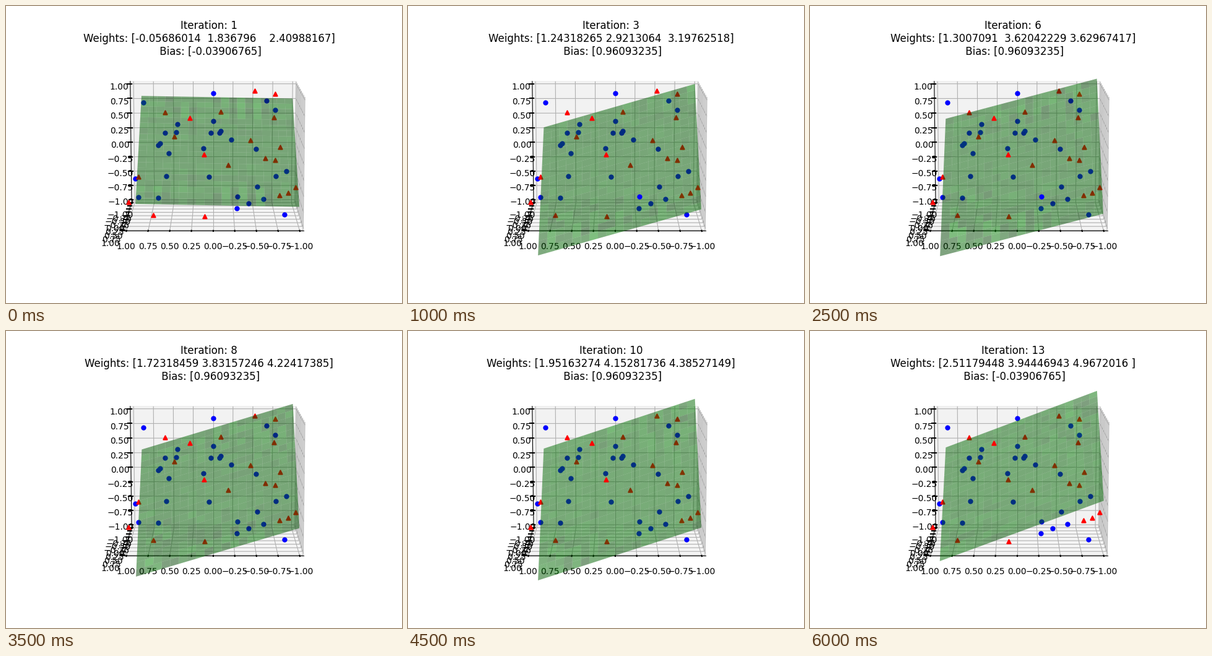
Recreate the animation shown at these times as a matplotlib script. Size 640 by 480 pixels, loop 6.5 s.

```python
import numpy as np
import matplotlib.pyplot as plt
from matplotlib.animation import FuncAnimation
from matplotlib.collections import LineCollection, PolyCollection

W, H = 640, 480
ELEV = np.radians(10)
COS, SIN = np.cos(ELEV), np.sin(ELEV)
DIST = 10
SX, SY = 496 / 0.185, 369.6 / 0.185
CX, CY = 80 + 0.095 * SX, H - 52.8 - 0.095 * SY

BOX = 1 + 1 / 24          # half size of the axes box
LABEL = BOX + 0.1476      # where tick labels sit
TICK_IN, TICK_OUT = BOX - 0.1 / 6, BOX + 0.2 / 6
TICKS = np.linspace(-1, 1, 9)

# weights and bias for each iteration
LOW, HIGH = -0.03906765, 0.96093235
STEPS = [
    (-0.05686014, 1.836796, 2.40988167, LOW),
    (1.70490788, 2.3619892, 2.52166977, LOW),
    (1.24318265, 2.9213064, 3.19762518, HIGH),
    (0.94808317, 3.30645802, 3.39804785, HIGH),
    (1.12263841, 3.46173925, 3.62418573, HIGH),
    (1.3007091, 3.62042229, 3.62967417, HIGH),
    (1.48172536, 3.78264918, 3.95538264, HIGH),
    (1.72318459, 3.83157246, 4.22417385, HIGH),
    (1.93250722, 3.55548641, 4.87533502, LOW),
    (1.95163274, 4.15281736, 4.38527149, HIGH),
    (1.87434082, 4.50967497, 4.19907435, HIGH),
    (2.51179448, 3.94446943, 4.9672016, LOW),
    (2.51179448, 3.94446943, 4.9672016, LOW),
]

BLUE = [(222, 156), (335, 141), (421, 153), (435, 168), (335, 186), (277, 191),
        (257, 205), (275, 204), (331, 205), (345, 205), (347, 202), (364, 216),
        (246, 225), (249, 222), (263, 238), (319, 230), (404, 231), (259, 275),
        (328, 276), (209, 279), (453, 267), (436, 275), (406, 292), (416, 312),
        (392, 319), (373, 327), (450, 337), (214, 309), (246, 310)]
RED = [(402, 137), (435, 142), (257, 172), (347, 171), (433, 180), (272, 211),
       (395, 217), (443, 228), (419, 246), (435, 249), (359, 257), (214, 276),
       (468, 293), (456, 302), (442, 306), (198, 317), (238, 338), (321, 340)]
# points close to the viewer: x, y, nearness, colour, marker
NEAR = [(297, 181, 0.45, "red", "^"),
        (320, 240, 0.4235, "red", "^"),
        (374, 308, 0.3825, "blue", "o")]


def nearness(y, z):
    return (y * COS + z * SIN) / 2


def project(x, y, z):
    """Data coordinates to stage pixels, seen along the y axis."""
    depth = DIST - nearness(y, z)
    up = (z * COS - y * SIN) / 2
    return CX - SX * x / 2 / depth, CY - SY * up / depth


def path(*points):
    return [project(*p) for p in points]


fig = plt.figure(figsize=(W / 100, H / 100), dpi=100, facecolor="white")
ax = fig.add_axes([0, 0, 1, 1])
ax.set_xlim(0, W)
ax.set_ylim(H, 0)
ax.axis("off")


def add_pane(grey, *corners):
    ax.fill(*zip(*path(*corners)), facecolor=(grey,) * 3, edgecolor=(grey,) * 3,
            alpha=0.5, linewidth=1, zorder=0)


def add_line(points, width, z):
    ax.plot(*zip(*points), color="black", linewidth=width, zorder=z)


def add_axis(line, grid, tick, label):
    """Axis line, then grid, tick and label for each tick value."""
    add_line(path(*line), 0.8, 1)
    ax.add_collection(LineCollection([path(*grid(t)) for t in TICKS],
                                     colors="#b0b0b0", linewidths=0.8, zorder=1.1))
    for t in TICKS:
        add_line(path(*tick(t)), 1.5, 1.2)
        ax.text(*project(*label(t)), f"{t:.2f}".replace("-", "\u2212"),
                fontsize=10, family="DejaVu Sans", ha="center", va="top", zorder=1.3)


B = BOX
add_pane(0.95, (-B, -B, -B), (-B, B, -B), (-B, B, B), (-B, -B, B))
add_pane(0.90, (-B, -B, -B), (B, -B, -B), (B, -B, B), (-B, -B, B))
add_pane(0.925, (-B, -B, -B), (B, -B, -B), (B, B, -B), (-B, B, -B))

add_axis([(-B, B, -B), (B, B, -B)],
         lambda t: [(t, B, -B), (t, -B, -B), (t, -B, B)],
         lambda t: [(t, TICK_IN, -B), (t, TICK_OUT, -B)],
         lambda t: (t, LABEL, -LABEL))
add_axis([(B, -B, -B), (B, B, -B)],
         lambda t: [(-B, t, B), (-B, t, -B), (B, t, -B)],
         lambda t: [(TICK_IN, t, -B), (TICK_OUT, t, -B)],
         lambda t: (LABEL, t, -LABEL))
add_axis([(B, -B, -B), (B, -B, B)],
         lambda t: [(B, -B, t), (-B, -B, t), (-B, B, t)],
         lambda t: [(TICK_IN, -B, t), (TICK_OUT, -B, t)],
         lambda t: (LABEL, -LABEL, t))


def add_points(points, color, marker, z):
    return ax.scatter(*zip(*points), s=20, c=color, marker=marker,
                      linewidths=1.5, zorder=z)


add_points(BLUE, "blue", "o", 4)
add_points(RED, "red", "^", 4)
near = [(add_points([(x, y)], color, marker, 6), p)
        for x, y, p, color, marker in NEAR]

surface = PolyCollection([], edgecolors="none", linewidths=0, zorder=5)
ax.add_collection(surface, autolim=False)
title = ax.text(328, 78.835, "", fontsize=12, family="DejaVu Sans",
                ha="center", va="baseline", zorder=7)

GX, GY = np.meshgrid(np.arange(-1, 1, 0.1), np.arange(-1, 1, 0.1))


def cells(grid):
    """Four corners of every mesh cell, in drawing order."""
    corners = [grid[:-1, :-1], grid[:-1, 1:], grid[1:, 1:], grid[1:, :-1]]
    return np.stack(corners, axis=2).reshape(-1, 4, grid.shape[-1])


def shade(quads):
    """Light on each cell, stretched to the full range: rounding makes the mottle."""
    n = np.cross(quads[:, 0] - quads[:, 1], quads[:, 1] - quads[:, 2])
    light = (n / np.linalg.norm(n, axis=1, keepdims=True)) @ np.array([-1, -1, 0.5])
    span = np.ptp(light)
    level = (light - light.min()) / span if span else np.ones_like(light)
    colors = np.zeros((len(quads), 4))
    colors[:, 1] = (0.5 + 0.5 * level) * 128 / 255
    colors[:, 3] = 0.5
    return colors


def update(i):
    a, b, c, bias = STEPS[i]
    gz = (-a * GX - b * GY - bias) / c
    quads = cells(np.dstack([GX, GY, gz]))
    surface.set_verts(cells(np.dstack(project(GX, GY, gz))))
    surface.set_facecolors(shade(quads))
    front = nearness(GY, gz).max()
    for dot, p in near:
        dot.set_zorder(6 if p > front else 4)
    title.set_text(f"Iteration: {i + 1}\nWeights: {np.array([a, b, c])}\n"
                   f" Bias: {np.array([bias])}")
    return [surface, title]


anim = FuncAnimation(fig, update, frames=len(STEPS), interval=500,
                     repeat=True, repeat_delay=0, blit=False)
plt.show()
```
